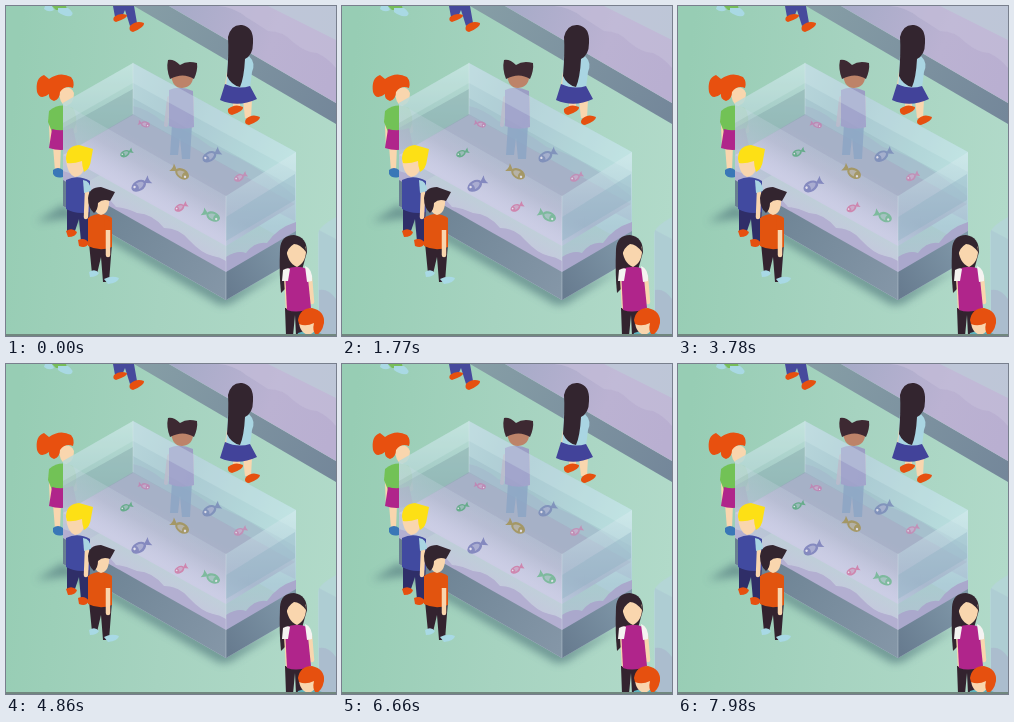
These frames come from a looping animation (330x330 px, 8 s). An HTML page:

```html
<!DOCTYPE html>
<html lang="en">
<head>
<meta charset="utf-8">
<title>Aquarium visitors</title>
<style>
html, body { margin: 0; width: 100%; height: 100%; overflow: hidden; background: #a4d2bd; }
svg { display: block; width: 100%; height: 100%; }
.skin { fill: #f9d6ae; }
.line { fill: none; stroke-linecap: round; stroke-linejoin: round; }
.arm { stroke: #f9d6ae; stroke-width: 4.5; }
</style>
</head>
<body>
<svg viewBox="0 0 330 330">
<defs>
  <linearGradient id="floor" x1="0" y1=".5" x2="1" y2=".6">
    <stop offset="0" stop-color="#97cdb4"/><stop offset=".5" stop-color="#a6d3c0"/><stop offset="1" stop-color="#b1dac9"/>
  </linearGradient>
  <linearGradient id="farGlass" gradientUnits="userSpaceOnUse" x1="170" y1="0" x2="330" y2="60">
    <stop offset="0" stop-color="#a7abc8"/><stop offset=".6" stop-color="#bbb2d2"/><stop offset="1" stop-color="#b9afd1"/>
  </linearGradient>
  <linearGradient id="farBase" gradientUnits="userSpaceOnUse" x1="130" y1="0" x2="330" y2="110">
    <stop offset="0" stop-color="#869ea6"/><stop offset="1" stop-color="#74879a"/>
  </linearGradient>
  <linearGradient id="backWall" x1="0" y1="0" x2="1" y2=".5">
    <stop offset="0" stop-color="#b4d2d9"/><stop offset=".4" stop-color="#a6c6d0"/><stop offset="1" stop-color="#b5dcdc"/>
  </linearGradient>
  <linearGradient id="sideWall" x1="0" y1="0" x2="0" y2="1">
    <stop offset="0" stop-color="#bcdfda"/><stop offset=".5" stop-color="#98bfbf"/><stop offset="1" stop-color="#84a5ab"/>
  </linearGradient>
  <linearGradient id="water" gradientUnits="userSpaceOnUse" x1="164" y1="150" x2="140" y2="192">
    <stop offset="0" stop-color="#a0a9c3"/><stop offset=".45" stop-color="#a9aac6"/><stop offset="1" stop-color="#cbcce4"/>
  </linearGradient>
  <linearGradient id="left" gradientUnits="userSpaceOnUse" x1="151" y1="140" x2="115" y2="204">
    <stop offset="0" stop-color="#c8dde2" stop-opacity=".3"/><stop offset=".55" stop-color="#cdd1e7" stop-opacity=".55"/><stop offset="1" stop-color="#c7c6e0" stop-opacity=".9"/>
  </linearGradient>
  <linearGradient id="right" x1="0" y1="0" x2="0" y2="1">
    <stop offset="0" stop-color="#d3eaec" stop-opacity=".65"/><stop offset=".5" stop-color="#a9c3d4" stop-opacity=".6"/><stop offset="1" stop-color="#bcb8d6"/>
  </linearGradient>
  <linearGradient id="base" gradientUnits="userSpaceOnUse" x1="60" y1="180" x2="220" y2="280">
    <stop offset="0" stop-color="#687f90"/><stop offset="1" stop-color="#8496a7"/>
  </linearGradient>
  <linearGradient id="baseR" gradientUnits="userSpaceOnUse" x1="220" y1="280" x2="290" y2="235">
    <stop offset="0" stop-color="#687c90"/><stop offset="1" stop-color="#8199aa"/>
  </linearGradient>
  <filter id="soft" x="-20%" y="-20%" width="140%" height="140%"><feGaussianBlur stdDeviation="4"/></filter>
  <g id="fish">
    <ellipse cx="-2.5" rx="7.5" ry="5"/>
    <path d="M3 0L10-4.5Q8 0 10 4.5Z"/>
    <path d="M-4-3Q2-3.500 3 0Q1 3-4 3Q-2 0-4-3Z" fill="#c9cbe0" opacity=".55"/>
    <circle cx="-6.500" cy="-1" r="1.200" fill="#e8e4ee"/>
  </g>
</defs>

<rect width="330" height="330" fill="url(#floor)"/>

<!-- far tank -->
<path d="M128 0H163L330 97V118Z" fill="url(#farBase)"/>
<path d="M163 0H330V97Z" fill="url(#farGlass)"/>
<path d="M212 0Q228 1 240 11Q250 17 262 25Q277 25 287 36Q300 47 311 47Q322 52 330 62V0Z" fill="#c3bdd8" opacity=".75"/>
<path d="M262 0H330V34Z" fill="#bcd3da" opacity=".5"/>

<!-- near tank corner -->
<path d="M312 228Q312 221 330 211V330H312Z" fill="#b4d6d6"/>
<path d="M313 224L330 233V330H313Z" fill="#a9c6d2" opacity=".5"/>
<path d="M313 284Q322 282 330 293V330H313Z" fill="#a9b2cb" opacity=".6"/>

<!-- passers-by -->
<g>
  <path d="M39 0H46L48 4Q43 7 38 3Z" fill="#a9d9e4"/>
  <path d="M46 0H60L61 4H50Z" fill="#77bd5b"/>
  <path d="M52 2H62Q69 7 65 10Q58 11 52 6Z" fill="#a9d9e4"/>
  <path d="M107 0H128L131 17L124 20L119 4L116 11H109Z" fill="#474a9c"/>
  <path d="M108 11Q114 6 121 9Q122 12 110 16Q106 15 108 11ZM124 20Q130 14 138 17Q139 21 127 26Q122 25 124 20Z" fill="#e6500f"/>
</g>
<g>
  <path class="skin" d="M226 94H234V103H228ZM237 94H246L245 112H239Z"/>
  <path d="M222 103Q229 97 237 101Q238 105 226 109Q221 108 222 103ZM240 113Q246 107 254 111Q254 115 243 119Q237 118 240 113Z" fill="#e6500f"/>
  <path class="line arm" d="M223 67L221 81M243 62L241 82"/>
  <path d="M222 50H243Q250 57 246 66L244 82H220Z" fill="#a9d5e2"/>
  <path d="M219 78Q232 84 244 80L251 93Q232 102 214 94Z" fill="#42439a"/>
  <path class="skin" d="M238 30Q245 36 242 50H233Z"/>
  <path d="M222 31Q225 18 236 19Q248 21 247 37Q247 49 239 53Q238 72 234 81Q225 79 221 70Q223 45 222 31Z" fill="#33252f"/>
</g>

<!-- red-haired girl, partly behind the glass -->
<g>
  <path class="skin" d="M47 140H55L54 165H49ZM57 140H63L61 160H57Z"/>
  <path d="M47 164Q52 160 57 164V171Q50 173 47 168Z" fill="#3a77b7"/>
  <path class="line arm" d="M45 112L46 138M67 110L69 125"/>
  <path d="M43 105Q54 96 67 102Q71 109 70 118L67 126H46L42 116Z" fill="#72c256"/>
  <path d="M46 123Q56 126 67 122L71 140Q57 147 43 142Z" fill="#b0258b"/>
  <path class="skin" d="M53 84Q64 78 68 87Q68 98 60 100Q53 98 53 84Z"/>
  <path d="M43 73Q54 65 65 71Q69 76 67 82Q59 79 54 86Q54 93 48 95Q42 93 43 88Q34 95 31 86Q29 72 38 69Z" fill="#e8500f"/>
</g>

<!-- main tank -->
<path d="M57 199L30 216L64 212L214 299L224 298L280 262L220 288Z" fill="#547c80" opacity=".7" filter="url(#soft)"/>
<path d="M57 97L127 57V150L57 190Z" fill="url(#sideWall)" opacity=".8"/>
<path d="M127 57L290 146V240L127 150Z" fill="url(#backWall)"/>
<path d="M127 100Q142 103 156 115Q180 122 205 141Q240 150 289 190V215L127 135Z" fill="#a9b3cd" opacity=".6"/>
<path d="M57 149L127 108L289 198L220 240Z" fill="url(#water)"/>
<path d="M57 122L127 83V109L57 149Z" fill="#7b9ea3" opacity=".45"/>
<path d="M127 109L220 160L289 198V182L220 144L127 92Z" fill="#8fb0bf" opacity=".4"/>

<!-- child behind the glass -->
<g opacity=".78">
  <path class="line" d="M163 92L160 119M186 92L186 120" stroke="#bbb4c8" stroke-width="4"/>
  <path d="M166 118H186L184 153H176L174 132L172 149H164Z" fill="#829bc1"/>
  <path d="M163 84Q174 79 187 85L188 121Q175 125 163 120Z" fill="#9990c6"/>
</g>
<path d="M165 68Q176 63 187 68Q188 81 176 82Q166 82 165 68Z" fill="#bd8369"/>
<path d="M162 54Q168 53 174 59Q181 54 191 57Q192 64 188 73Q177 66 164 73Q160 63 162 54Z" fill="#3d2932"/>

<path d="M57 97L220 190V294L57 200Z" fill="url(#left)"/>
<path d="M220 190L290 146V253L220 294Z" fill="url(#right)"/>
<path d="M220 211L289 168V194L220 235Z" fill="#8bafbf" opacity=".35"/>
<path d="M57 165Q72 168 84 183Q98 185 110 201Q121 202 131 207Q147 208 158 222Q173 222 183 234Q196 248 207 250Q214 251 220 255V276L57 182Z" fill="#b3afd1"/>
<path d="M220 251Q231 244 240 247Q249 235 261 237Q271 222 290 216V234L220 276Z" fill="#aaa8cc"/>
<path d="M57 174L220 266V294L57 200Z" fill="url(#base)"/>
<path d="M220 266L290 225V253L220 294Z" fill="url(#baseR)"/>
<path d="M57 97L127 57L290 146L220 190Z" fill="#d9f0ec" opacity=".1"/>
<path d="M57 97L127 57V77L57 117ZM127 57L290 146V166L127 77Z" fill="#d8f0ee" opacity=".25"/>
<path class="line" d="M127 57V108M220 190V293" stroke="#d9e8ec" stroke-width="1" opacity=".35"/>

<g id="school" opacity=".85"></g>

<!-- fair-haired child -->
<g>
  <path d="M61 199H84L82 236H75L73 213L68 228H61Z" fill="#2f2e68"/>
  <path d="M60 225Q66 221 71 226Q70 231 62 231ZM72 234Q79 231 83 237Q80 243 73 240Z" fill="#e6500f"/>
  <path d="M60 174Q72 168 84 175L84 206Q71 209 60 203Z" fill="#414aa0"/>
  <path class="line arm" d="M81 186L80 211"/>
  <path d="M77 174Q85 175 85 185L78 187Z" fill="#a9d5e2"/>
  <path class="skin" d="M60 153H79Q80 169 69 171Q61 168 60 153Z"/>
  <path d="M60 153Q60 140 73 139L87 143L85 154Q84 163 78 166Q76 160 76 155Q67 158 61 157Z" fill="#fde015"/>
</g>

<!-- boy in orange -->
<g>
  <path d="M83 237H106L103 276H97L95 251L91 268H86Z" fill="#33232f"/>
  <path d="M83 266Q89 262 93 267Q91 271 84 271ZM98 273Q106 269 113 272Q112 277 102 278Z" fill="#a8d9e5"/>
  <path d="M82 212Q94 204 106 212L106 241Q94 246 82 240Z" fill="#e2540f"/>
  <path class="line arm" d="M102 222L102 249"/>
  <path d="M98 211Q106 213 106 224H99Z" fill="#e2540f"/>
  <path class="skin" d="M86 192H103Q104 207 95 209Q87 207 86 192Z"/>
  <path d="M82 192Q83 181 95 181L109 186Q107 190 104 195Q97 192 92 197Q92 204 88 207Q82 202 82 192Z" fill="#33252f"/>
</g>

<!-- girl in magenta -->
<g>
  <path d="M279 302H299L298 330H290L289 309L287 330H280Z" fill="#33232f"/>
  <path d="M274 243Q275 229 288 229Q301 231 301 246L296 264Q286 277 275 287Q273 268 274 243Z" fill="#33252f"/>
  <path class="line arm" d="M280 268L282 301M304 272L306 296"/>
  <path d="M279 264Q290 258 301 263L305 302Q292 308 281 304Z" fill="#b0258b"/>
  <path d="M299 260Q307 263 306 275L301 276ZM277 264Q282 261 284 263L282 275H276Z" fill="#f5f3f1"/>
  <path class="skin" d="M280 241Q290 233 300 241Q301 256 291 261Q281 257 280 241Z"/>
  <path d="M275 246Q278 232 288 230Q300 232 300 246Q294 238 288 238Q282 241 280 250Z" fill="#33252f"/>
</g>
<g>
  <path d="M292 327Q304 322 316 328V330H291Z" fill="#5fb3bd"/>
  <path class="skin" d="M293 311H310Q312 327 302 329Q292 326 293 311Z"/>
  <path d="M292 314Q294 302 306 302Q319 305 318 317Q316 327 310 329Q306 325 308 317Q300 321 293 318Z" fill="#e6500f"/>
</g>
<rect y="328" width="330" height="2" fill="#71877f"/>
</svg>
<script>
const LOOP = 8000, PERIOD = 1800, SWAY = 3;
const NS = "http://www.w3.org/2000/svg";
const school = document.getElementById("school");

// x, middle y, scale, turn, colour, direction of the bob
const fish = [
  [138, 121, .6, 195, "#c283b2", -1],
  [120.5, 144, .67, -25, "#5aaa80", 1],
  [205.5, 146.5, 1, -30, "#7b8cb9", 1],
  [234.5, 168, .7, -28, "#c68ab4", 1],
  [174, 163.5, 1, 212, "#a39356", 1],
  [135, 181.5, 1.05, -30, "#7a7fba", -1],
  [175, 204, .7, -28, "#d07ba6", -1],
  [205, 212.5, .95, 205, "#72b893", -1]
].map(([x, y, size, turn, color, dir]) => {
  const el = document.createElementNS(NS, "use");
  el.setAttribute("href", "#fish");
  el.setAttribute("fill", color);
  school.append(el);
  return { el, x, y, size, turn, dir };
});

function draw(ms) {
  const bob = SWAY * Math.cos(ms / PERIOD * 2 * Math.PI);
  for (const { el, x, y, size, turn, dir } of fish) {
    el.setAttribute("transform",
      `translate(${x} ${(y + dir * bob).toFixed(2)}) rotate(${turn}) scale(${size})`);
  }
}

const start = performance.now();
function tick() {
  draw((performance.now() - start) % LOOP);
  requestAnimationFrame(tick);
}
tick();
</script>
</body>
</html>
```
